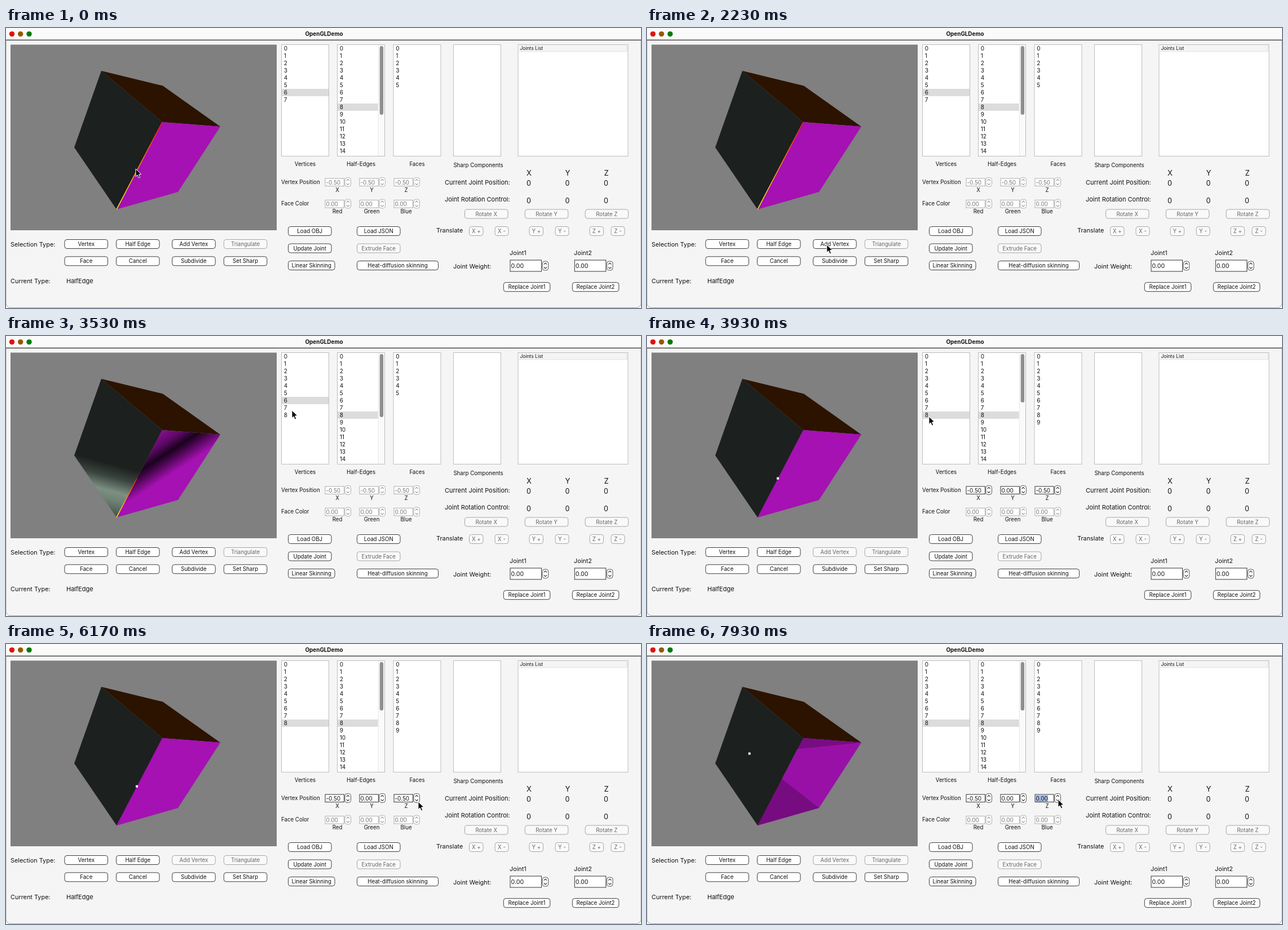
Animation of 1126x497 px, one loop 8 s. Source, as an HTML page:

```html
<!DOCTYPE html>
<html lang="en">
<head>
<meta charset="utf-8">
<title>OpenGLDemo</title>
<style>
html, body { margin: 0; width: 100%; height: 100%; overflow: hidden; background: #fff; }
svg { display: block; width: 1126px; height: 497px; }
text { font-family: Inter, "Liberation Sans", sans-serif; white-space: pre; }
</style>
</head>
<body>
<svg id="stage" viewBox="0 0 1126 497" xmlns="http://www.w3.org/2000/svg">
  <defs>
    <linearGradient id="edge" gradientUnits="userSpaceOnUse" x1="196" y1="322" x2="277" y2="167">
      <stop offset="0" stop-color="#ffff20"/><stop offset="1" stop-color="#ff1010"/>
    </linearGradient>
    <linearGradient id="halfEdge" gradientUnits="userSpaceOnUse" x1="196" y1="322" x2="232" y2="253">
      <stop offset="0" stop-color="#ffff20"/><stop offset="1" stop-color="#ff1010"/>
    </linearGradient>
    <linearGradient id="sheen" gradientUnits="userSpaceOnUse" x1="180" y1="225" x2="156.6" y2="312">
      <stop offset="0" stop-color="#1c201e"/><stop offset=".25" stop-color="#3a443e"/>
      <stop offset=".52" stop-color="#7b9082"/><stop offset=".7" stop-color="#6d8073"/>
      <stop offset="1" stop-color="#434f48"/>
    </linearGradient>
    <linearGradient id="shade" gradientUnits="userSpaceOnUse" x1="268" y1="172" x2="309" y2="235">
      <stop offset="0" stop-color="#8a0e95"/><stop offset=".3" stop-color="#5c0864"/>
      <stop offset=".53" stop-color="#1a021d"/><stop offset=".65" stop-color="#3c0542"/>
      <stop offset="1" stop-color="#a511b2"/>
    </linearGradient>
  </defs>
  <g id="chrome"></g>
  <g id="scene"></g>
  <g id="panel"></g>
  <path id="cursor" d="M0 0V13.6L3.1 10.8L5.4 16L7.8 15L5.5 9.9L9.8 9.6Z"
    fill="#000" stroke="#fff" stroke-width="1" stroke-linejoin="round"/>
</svg>
<script>
const LOOP = 8000;
const $ = id => document.getElementById(id);
const INK = '#111', DIM = '#777';

const rect = (x, y, w, h, fill, stroke = 'none', rx = 0) =>
  `<rect x="${x}" y="${y}" width="${w}" height="${h}" rx="${rx}" fill="${fill}" stroke="${stroke}"/>`;

// y is the middle of the capital letters
const text = (s, x, y, size, anchor = 'start', fill = INK, weight = 400) =>
  `<text x="${x}" y="${y + size * 0.364}" font-size="${size}" text-anchor="${anchor}" fill="${fill}" font-weight="${weight}">${s}</text>`;

const mid = (s, x, y, size = 9.7) => text(s, x, y, size, 'middle');

const button = (s, x, y, w, on = true) =>
  rect(x, y - 8, w, 16, on ? '#fff' : '#f9f9f9', on ? '#3c3c3c' : '#a6a6a6', 4) +
  text(s, x + w / 2, y, 9.7, 'middle', on ? INK : '#666');

const poly = (points, fill) =>
  `<polygon points="${points.join(' ')}" fill="${fill}"/>`;

const line = (a, b, stroke, width = 1) =>
  `<line x1="${a[0]}" y1="${a[1]}" x2="${b[0]}" y2="${b[1]}" stroke="${stroke}" stroke-width="${width}"/>`;

function stepper(x, y, on) {
  const c = on ? '#333' : '#999', m = x + 5.25;
  return rect(x, y - 8, 10.5, 16, '#fff', on ? '#555' : '#b0b0b0', 4) +
    `<path d="M${m - 2.6} ${y - 2.4}l2.6 -2.6l2.6 2.6M${m - 2.6} ${y + 2.4}l2.6 2.6l2.6 -2.6" fill="none" stroke="${c}" stroke-width="1.2"/>`;
}

function spin(value, x, y, on, selected) {
  return rect(x, y - 6.5, 33.5, 13.5, '#fff', on ? '#333' : '#adadad') +
    (selected ? rect(x + 1, y - 6, value.length > 4 ? 27 : 22, 12.5, '#a9bce6') : '') +
    text(value, x + 1.5, y + 0.4, 10, 'start', on ? INK : DIM) +
    stepper(x + 35, y, on);
}

function weightBox(x) {
  return rect(x, 412, 55.5, 20, '#fff', '#333') +
    text('0.00', x + 1.5, 422.5, 10.6) + stepper(x + 57.2, 422, true);
}

function list(x, count, selected, width = 84) {
  let s = '';
  for (let i = 0; i < count; i++) {
    const y = 36.5 + 13 * i;
    if (i === selected) s += rect(x + 0.5, y - 6.5, width - 1, 13, '#dcdcdc');
    s += text(i, x + 4.3, y, 10);
  }
  return s;
}

function drawChrome() {
  let s = rect(0, -12, 1126, 508.5, '#f5f5f5', '#a5a5a5', 8) +
    rect(0, 0, 1126, 21, '#fbfafa') + rect(0, 20.8, 1126, 1.2, '#222');
  [[10.5, '#e0140c'], [25.7, '#985700'], [41, '#007b0a']].forEach(([x, c]) =>
    s += `<circle cx="${x}" cy="10.6" r="4.7" fill="${c}"/>`);
  s += mid('OpenGLDemo', 564, 10.6, 9.9).replace('"400"', '"650"');
  s += rect(8, 29.5, 472, 329.5, '#808080');

  [[488.5, 84], [587.5, 84], [687, 84], [793.5, 84], [908, 195]].forEach(([x, w]) =>
    s += rect(x, 29.5, w, 198, '#fff', '#bdbdbd'));
  s += rect(908.5, 30, 194, 12, '#f4f4f4') + rect(908.5, 41.5, 194, 0.8, '#ddd') +
    rect(1101, 31, 0.8, 10, '#ccc') + text('Joints List', 911.5, 36.3, 8.5);

  s += mid('Vertices', 530.5, 241.5) + mid('Half-Edges', 629.5, 241.5) +
    mid('Faces', 729, 241.5) + mid('Sharp Components', 837.5, 243);
  s += text('Vertex Position', 488, 273.5, 9.7) + text('Face Color', 488, 311.7, 9.7);
  ['X', 'Y', 'Z'].forEach((axis, i) => {
    const x = 587.5 + 61 * i, far = 927.5 + 68.5 * i;
    s += mid(axis, x, 287.3) + mid(['Red', 'Green', 'Blue'][i], x, 325.2) +
      mid(axis, far, 257, 13) + mid('0', far - 0.5, 275.3, 12.5) + mid('0', far - 0.5, 306.2, 12.5) +
      button('Rotate ' + axis, 813.5 + 106.8 * i, 330, 76.5, false) +
      button(axis + ' +', [821.5, 928, 1035][i], 360.5, 24.5, false) +
      button(axis + ' -', [867, 974, 1073][i], 360.5, 24, false) +
      spin('0.00', 566 + 61 * i, 312, false);
  });
  s += text('Current Joint Position:', 778, 273.7, 11) +
    text('Joint Rotation Control:', 778, 304.2, 11) +
    text('Translate', 763, 359.2, 10.9) + text('Joint Weight:', 793, 422.7, 10.9) +
    text('Joint1', 893, 399.2, 10.8) + text('Joint2', 1007, 399.2, 10.8) +
    weightBox(894) + weightBox(1008.3);
  s += text('Selection Type:', 8, 384.2, 10.9) + text('Current Type:', 8, 449, 10.9) +
    text('HalfEdge', 107, 449, 11);

  s += button('Vertex', 104, 383.5, 76.5) + button('Half Edge', 195.5, 383.5, 76.5) +
    button('Triangulate', 386.3, 383.5, 76.5, false) +
    button('Face', 104, 413.8, 76.5) + button('Cancel', 195.5, 413.8, 76.5) +
    button('Subdivide', 294.7, 413.8, 76.5) + button('Set Sharp', 386.3, 413.8, 76.5) +
    button('Load OBJ', 500.5, 360.5, 76.5) + button('Load JSON', 622.5, 360.5, 76.5) +
    button('Update Joint', 500.5, 391, 76.5) + button('Extrude Face', 622.5, 391, 76.5, false) +
    button('Linear Skinning', 500.5, 421.5, 82.5) +
    button('Heat-diffusion skinning', 622.5, 421.5, 144) +
    button('Replace Joint1', 882.3, 459.7, 82.5) + button('Replace Joint2', 1004.3, 459.7, 82.5);
  $('chrome').innerHTML = s;
}

const ADD = 2500, PICK = 3800, STEP = 6850, STEP_GAP = 150;
const BACK = [169, 76], RIDGE = [278, 102.5], RIGHT = [380, 175], NEAR = [277, 167],
  LOW = [305, 291], FOOT = [196, 322], LEFT = [121, 212];
const lerp = (a, b, k) => a + (b - a) * k;
const magenta = dim => `rgb(${[165, 17, 178].map(c => Math.round(c * dim))})`;

function drawScene(phase, k) {
  const v = [lerp(232, 181.7, k), lerp(252.7, 194.5, k)];
  const side = [BACK, NEAR, FOOT, LEFT];
  let s = poly([BACK, RIDGE, RIGHT, NEAR], '#2b1300');
  if (phase === 2) {
    // the moved vertex pulls a dent into the face, hidden behind the dark side
    s += poly([NEAR, RIGHT, LOW, FOOT], magenta(lerp(1, 0.93, k))) +
      poly([NEAR, RIGHT, v], magenta(lerp(1, 0.73, k))) +
      poly([LOW, FOOT, v], magenta(lerp(1, 0.72, k)));
  } else {
    s += poly([NEAR, RIGHT, LOW, FOOT], phase ? 'url(#shade)' : magenta(1));
  }
  s += poly(side, phase === 1 ? 'url(#sheen)' : '#1c201e');
  if (phase === 0) s += line(FOOT, NEAR, 'url(#edge)', 1.5);
  if (phase === 1) s += line(FOOT, [232, 253], 'url(#halfEdge)', 1.5);
  if (phase === 2) s += rect(v[0] - 2, v[1] - 2, 4, 4, '#fff');
  $('scene').innerHTML = s;
}

function drawPanel(phase, steps) {
  const picked = phase === 2;
  const z = (steps - 5) / 10;
  const thumb = [122, 112, 86][phase];
  $('panel').innerHTML =
    list(488.5, phase ? 9 : 8, picked ? 8 : 6) +
    list(587.5, 15, 8, 72.5) +
    list(687, picked ? 10 : 6, -1) +
    rect(660, 30, 11, 197, '#fafafa') + rect(659.8, 30, 0.8, 197, '#e2e2e2') +
    rect(662.7, 32, 6.4, thumb, '#8f8f8f', 'none', 3.2) +
    spin('-0.50', 566, 273.5, picked) +
    spin(picked ? '0.00' : '-0.50', 627, 273.5, picked) +
    spin(z.toFixed(2), 688, 273.5, picked, steps > 0) +
    button('Add Vertex', 294.7, 383.5, 76.5, !picked);
}

// time, x, y of the pointer tip
const PATH = [
  [0, 230, 250], [800, 235, 265], [1500, 235, 265], [2250, 319, 385], [2840, 319, 385],
  [3500, 507, 132], [3560, 507, 132], [3780, 500, 143], [4170, 500, 143], [4370, 508, 196],
  [4620, 508, 196], [4870, 573, 234], [5230, 655, 262], [5420, 655, 262], [6170, 731, 280],
  [6490, 731, 280], [6530, 729.5, 280], [6660, 729.5, 280], [6800, 728, 269.5],
  [7850, 728, 269.5], [7930, 729, 276], [8000, 729, 276]
];

function pointer(t) {
  const i = PATH.findIndex(p => p[0] > t);
  const a = PATH[i - 1], b = PATH[i];
  const u = (t - a[0]) / (b[0] - a[0]);
  const k = u * u * (3 - 2 * u);
  return [lerp(a[1], b[1], k), lerp(a[2], b[2], k)];
}

let shown = '';
function render(t) {
  const phase = t < ADD ? 0 : t < PICK ? 1 : 2;
  const steps = t < STEP ? 0 : Math.min(5, 1 + Math.floor((t - STEP) / STEP_GAP));
  const key = phase + ':' + steps;
  if (key !== shown) {
    shown = key;
    drawScene(phase, steps / 5);
    drawPanel(phase, steps);
  }
  $('cursor').setAttribute('transform', `translate(${pointer(t)})`);
}

drawChrome();
const start = performance.now();
function tick() {
  render((performance.now() - start) % LOOP);
  requestAnimationFrame(tick);
}
tick();
</script>
</body>
</html>
```
